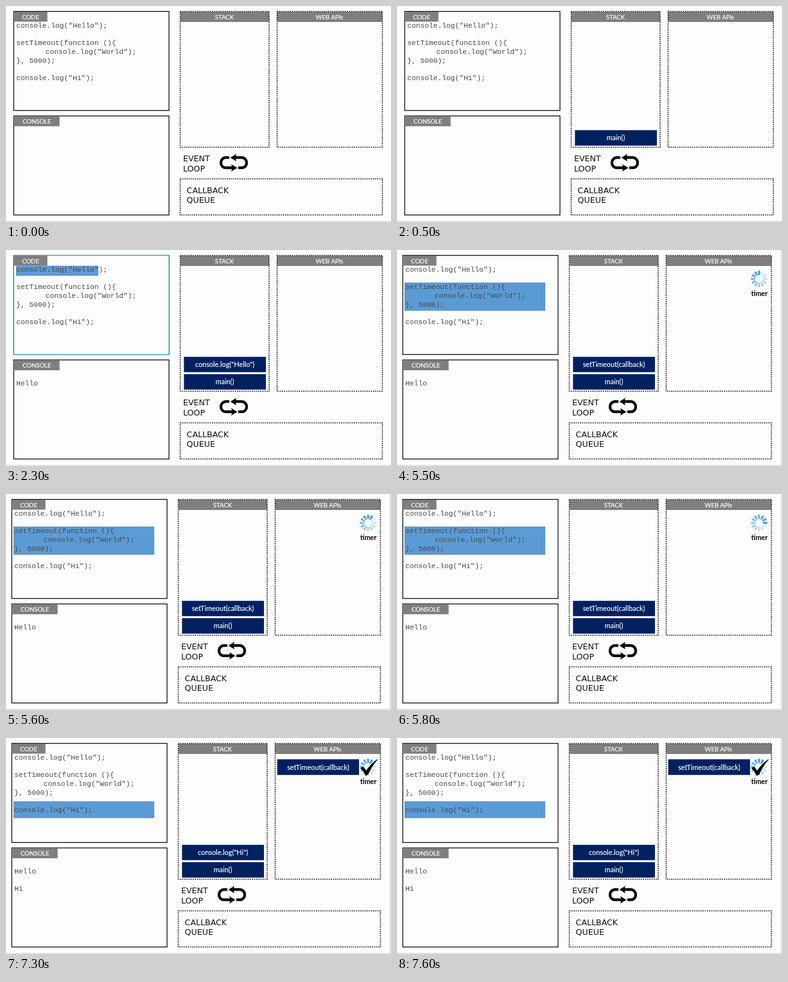
Write an HTML page that moves like this. It is 600x338 px and loops after 8 s.

```html
<!DOCTYPE html>
<html lang="en">
<head>
<meta charset="utf-8">
<title>Event loop</title>
<style>
  html, body { margin: 0; width: 100%; height: 100%; overflow: hidden; background: #fdfdfd; }
  svg { display: block; width: 600px; height: 338px; }
  text { white-space: pre; }

  .panel { fill: #fefdfe; stroke: #111; stroke-width: 1.3; }
  .dotted { fill: none; stroke: #111; stroke-width: 1.6; stroke-dasharray: 1.7 1.6; }
  .tab { fill: #7f7f7f; }
  .label { font: 9.6px Lato, sans-serif; fill: #fff; stroke: #fff; stroke-width: .2; text-anchor: middle; }
  .code { font: 11.28px "Liberation Mono", monospace; fill: #484848; }
  .title { font: 12.6px "DejaVu Sans", sans-serif; fill: #111; }
  .block rect { fill: #002060; }
  .block text { font: 10.9px Lato, sans-serif; fill: #fff; stroke: #fff; stroke-width: .15; text-anchor: middle; }
  .mark { fill: #5b9bd5; stroke: #41719c; stroke-width: .5; }
  .timer { font: 700 10.7px Lato, sans-serif; text-anchor: middle; }

  .page, .main, .hello, .wait, .hi, .printed, .pending, .spin { animation: 8s step-end infinite; }
  .page { animation-name: shift; }
  .main { animation-name: main; }
  .hello { animation-name: hello; }
  .printed { animation-name: printed; }
  .wait { animation-name: wait; }
  .pending { animation-name: pending; }
  .hi { animation-name: hi; }
  .spin { animation-name: spin; }

  @keyframes shift { 0% { transform: none; } 68.75%, 100% { transform: translateX(-3px); } }
  @keyframes main { 0% { visibility: hidden; } 6.25%, 100% { visibility: visible; } }
  @keyframes hello { 0%, 68.75%, 100% { visibility: hidden; } 26.25% { visibility: visible; } }
  @keyframes printed { 0% { visibility: hidden; } 26.25%, 100% { visibility: visible; } }
  @keyframes wait { 0%, 88.75%, 100% { visibility: hidden; } 68.75% { visibility: visible; } }
  @keyframes pending { 0% { visibility: hidden; } 68.75%, 100% { visibility: visible; } }
  @keyframes hi { 0% { visibility: hidden; } 88.75%, 100% { visibility: visible; } }
  @keyframes spin {
    0% { transform: none; }
    70% { transform: rotate(30deg); }
    71.25% { transform: rotate(60deg); }
    72.5% { transform: rotate(90deg); }
    88.75%, 100% { transform: rotate(30deg); }
  }
</style>
</head>
<body>
<svg viewBox="0 0 600 338">
  <path d="M0 337H600" stroke="#cfcfcf"/>
  <g class="page">
    <path d="M601.5 0V337" stroke="#d4d4d4"/>

    <!-- Code -->
    <rect class="panel" x="12" y="8.5" width="242" height="155"/>
    <rect class="panel hello" x="12" y="8.5" width="242" height="155" style="stroke:#35a9cc"/>
    <rect class="tab" x="12" y="9" width="52.5" height="15.5"/>
    <text class="label" x="38.3" y="20.5">CODE</text>
    <rect class="mark hello" x="16" y="25" width="127.5" height="15"/>
    <rect class="mark wait" x="15" y="51.2" width="218.8" height="43.6"/>
    <rect class="mark hi" x="15" y="99.5" width="218.8" height="25.5"/>
    <g class="code">
      <text x="16" y="34">console.log("Hello");</text>
      <text x="16" y="61.3">setTimeout(function (){</text>
      <text x="61.4" y="75">console.log("World");</text>
      <text x="16" y="88.5">}, 5000);</text>
      <text x="16" y="115.7">console.log("Hi");</text>
    </g>

    <!-- Console -->
    <rect class="panel" x="12" y="172" width="242" height="155"/>
    <rect class="tab" x="12" y="172.7" width="71.5" height="15.5"/>
    <text class="label" x="48" y="184.2">CONSOLE</text>
    <text class="code printed" x="16" y="211.5">Hello</text>
    <text class="code hi" x="16" y="238.8">Hi</text>

    <!-- Stack -->
    <rect class="tab" x="272" y="9" width="138" height="16"/>
    <rect class="dotted" x="271.5" y="8.5" width="138.5" height="212.5"/>
    <text class="label" x="340.5" y="20.7">STACK</text>
    <g class="block main">
      <rect x="277.3" y="194.3" width="127.7" height="24.2"/>
      <text x="341" y="210">main()</text>
    </g>
    <g class="block hello">
      <rect x="277.3" y="167.2" width="127.7" height="24"/>
      <text x="341" y="183">console.log("Hello")</text>
    </g>
    <g class="block wait">
      <rect x="277.3" y="167.2" width="127.7" height="24"/>
      <text x="341" y="183">setTimeout(callback)</text>
    </g>
    <g class="block hi">
      <rect x="277.3" y="167.2" width="127.7" height="24"/>
      <text x="341" y="183">console.log("Hi")</text>
    </g>

    <!-- Web APIs -->
    <rect class="tab" x="422.5" y="9" width="164" height="16"/>
    <rect class="dotted" x="422.5" y="8.5" width="164" height="212.5"/>
    <text class="label" x="504" y="20.7">WEB APIs</text>
    <g class="pending">
      <g transform="translate(567.3 45.2)"><g class="spin" id="blades"></g></g>
      <text class="timer" x="567.8" y="72">timer</text>
    </g>
    <g class="block hi">
      <rect x="425.7" y="33.3" width="127.5" height="24.5"/>
      <text x="489.5" y="49.5">setTimeout(callback)</text>
    </g>
    <path class="hi" d="M555.3 47.5Q558.5 43.5 561 46.5L564.3 51Q571 40.5 581.5 33.2L582 34Q572.5 45 567.3 57.3L563.5 59.3Q560.5 52 555.3 47.5Z"/>

    <!-- Event loop -->
    <g class="title">
      <text x="276" y="243.2">EVENT</text>
      <text x="276" y="258.6">LOOP</text>
    </g>
    <g fill="none" stroke="#000" stroke-width="4.2">
      <path d="M348 237.2H342.5a7.5 7.5 0 0 0-7.5 7.5v1a7.5 7.5 0 0 0 7.5 7.5H353"/>
      <path d="M362 253.2H367.5a7.5 7.5 0 0 0 7.5-7.5v-1a7.5 7.5 0 0 0-7.5-7.5H357"/>
    </g>
    <path d="M349.5 237.2L359 231.4L357.3 237.2L359 243ZM360.5 253.2L351 247.4L352.7 253.2L351 259Z"/>

    <!-- Callback queue -->
    <rect class="dotted" x="271.5" y="270.5" width="315" height="56.5"/>
    <g class="title">
      <text x="281.6" y="293.2">CALLBACK</text>
      <text x="281.6" y="308.4">QUEUE</text>
    </g>
  </g>
</svg>
<script>
  const blades = document.getElementById('blades');
  const count = 12;
  for (let i = 0; i < count; i++) {
    const blade = document.createElementNS('http://www.w3.org/2000/svg', 'path');
    blade.setAttribute('d', 'M-1.1-5.8L-1.8-12.2Q0-13.8 1.8-12.2L1.1-5.8Z');
    blade.setAttribute('transform', `rotate(${-i * 360 / count})`);
    blade.setAttribute('fill', '#2f8fdd');
    blade.setAttribute('opacity', 1 - 0.85 * i / (count - 1));
    blades.append(blade);
  }
</script>
</body>
</html>
```
